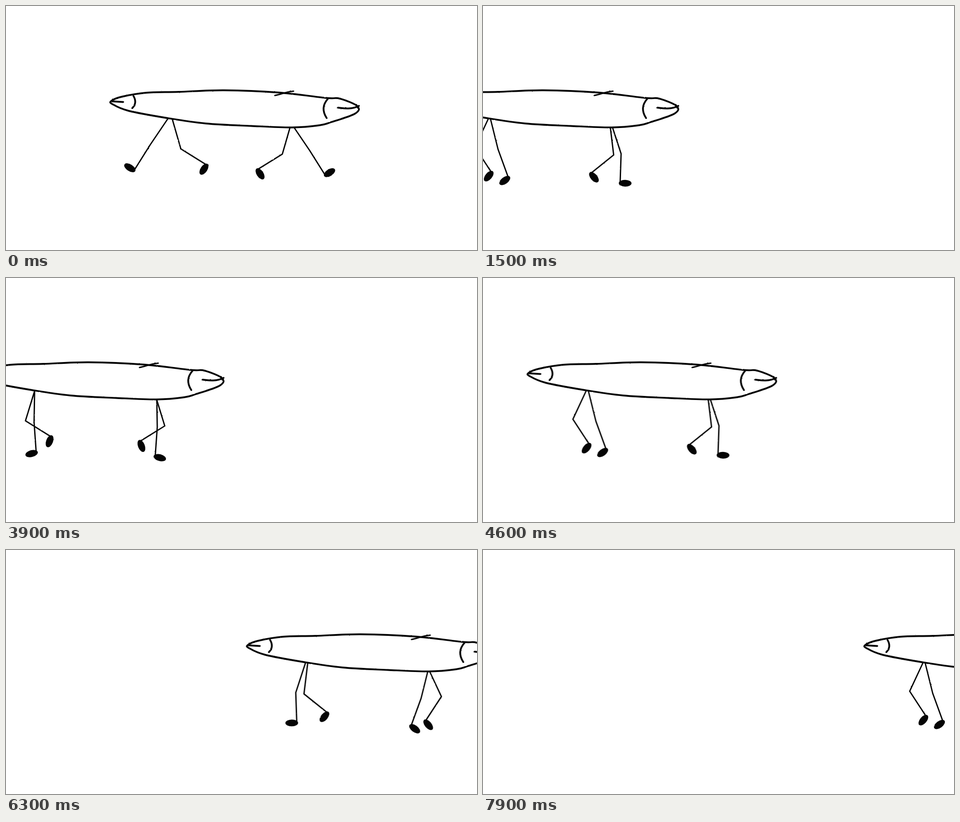
An HTML page that plays this animation: 1037 px wide and 540 px high, repeating every 8 s.

```html
<!DOCTYPE html>
<html lang="en">
<head>
<meta charset="utf-8">
<title>Walking fish</title>
<style>
html, body { margin: 0; width: 100%; height: 100%; overflow: hidden; background: #fff; }
svg { display: block; width: 1037px; height: 540px; }
.ink { fill: none; stroke: #050505; stroke-width: 3.9; stroke-linecap: round; stroke-linejoin: round; }
.leg { stroke-width: 2.9; }
.foot { fill: #050505; stroke: none; }
</style>
</head>
<body>
<svg viewBox="0 0 1037 540">
  <defs>
    <filter id="rough" filterUnits="userSpaceOnUse" x="200" y="150" width="620" height="290" color-interpolation-filters="sRGB">
      <feTurbulence type="fractalNoise" baseFrequency="0.22" numOctaves="2" seed="4"/>
      <feDisplacementMap in="SourceGraphic" scale="1.8" xChannelSelector="R" yChannelSelector="G"/>
    </filter>
  </defs>
  <g id="fish" class="ink" filter="url(#rough)">
    <path id="outline"/>
    <path d="M280 198Q290 214 278 226"/>
    <path d="M234 211L258 212.5"/>
    <path d="M709 205Q691 225 706 248"/>
    <path d="M731 225C745 227 762 229 777 221"/>
    <path d="M771 219L775 225" stroke-width="4.5"/>
    <path d="M592 198C605 196 615 190 633 188.5" stroke-width="3.2"/>
    <g id="legs" class="leg"></g>
  </g>
</svg>
<script>
const STEP = 100, LOOP = 8000, RAD = Math.PI / 180;

const OUTLINE = [
  [232, 210], [254, 201], [308, 192], [380, 190], [480, 186.5], [600, 191.5], [705, 203.5],
  [735, 205], [774, 222], [768, 238.5], [716, 257], [690, 264], [630, 268.7], [540, 265.5],
  [440, 260], [355, 248], [270, 232], [234, 217]
];

// Step, body offset, gait phase (12 per stride); the gait runs backwards on the way left
const WALK = [[0, 0, 0], [15, -347, -22], [26, -608, -39], [39, -298, -21],
  [53, 35, 1], [76.85, 669, 36], [79, 610, 32]];

// The rear pair is a mirrored walker, so its stride runs the other way
const PAIRS = [
  { x: 630, y: 270, face: 1, thigh: 60, shin: 62 },
  { x: 361, y: 250, face: -1, thigh: 69, shin: 64 }
];

const byId = id => document.getElementById(id);

function closedCurve(pts) {
  const n = pts.length, at = i => pts[(i + n) % n];
  let d = `M${pts[0]}`;
  for (let i = 0; i < n; i++) {
    const [a, b, c, e] = [at(i - 1), at(i), at(i + 1), at(i + 2)];
    const out = b.map((v, k) => v + (c[k] - a[k]) / 6);
    const into = c.map((v, k) => v - (e[k] - b[k]) / 6);
    d += `C${out} ${into} ${c}`;
  }
  return d + "Z";
}

function walkAt(s) {
  const i = Math.max(1, WALK.findIndex(key => key[0] >= s));
  const [from, to] = [WALK[i - 1], WALK[i]];
  const u = (s - from[0]) / (to[0] - from[0]);
  return [1, 2].map(k => from[k] + (to[k] - from[k]) * u);
}

// Two-bone leg facing right: angles in degrees, forward of straight down
function leg(a, { thigh, shin }) {
  const { sin, cos } = Math;
  const hip = 9 + 25 * cos(a) - 8 * sin(a) + 4 * sin(2 * a);
  const calf = -22 + 36 * cos(a) + 18 * sin(a) + 9 * cos(2 * a) + 9 * cos(3 * a) - 9 * sin(3 * a);
  const sole = 5 - calf - 12 * cos(2 * a - Math.PI / 3);
  const top = 5 * cos(a);
  const kx = top + thigh * sin(hip * RAD), ky = thigh * cos(hip * RAD);
  const ax = kx + shin * sin(calf * RAD), ay = ky + shin * cos(calf * RAD);
  return `<path d="M${top} 0L${kx} ${ky}L${ax} ${ay}"/>` +
    `<ellipse class="foot" cx="11" cy="3" rx="14" ry="7.5" transform="translate(${ax} ${ay}) rotate(${sole})"/>`;
}

function pairOfLegs(pair, phase) {
  const a = pair.face * phase * Math.PI / 6;
  return `<g transform="translate(${pair.x} ${pair.y}) scale(${pair.face} 1)">` +
    leg(a, pair) + leg(a + Math.PI, pair) + "</g>";
}

byId("outline").setAttribute("d", closedCurve(OUTLINE));

let shown = -1;
function draw(now) {
  const s = Math.floor(now % LOOP / STEP);
  if (s === shown) return;
  shown = s;
  const [x, phase] = walkAt(s);
  byId("fish").setAttribute("transform", `translate(${x.toFixed(1)} 0)`);
  byId("legs").innerHTML = PAIRS.map(pair => pairOfLegs(pair, Math.round(phase))).join("");
}

const start = performance.now();
function tick() {
  draw(performance.now() - start);
  requestAnimationFrame(tick);
}
tick();
</script>
</body>
</html>
```
